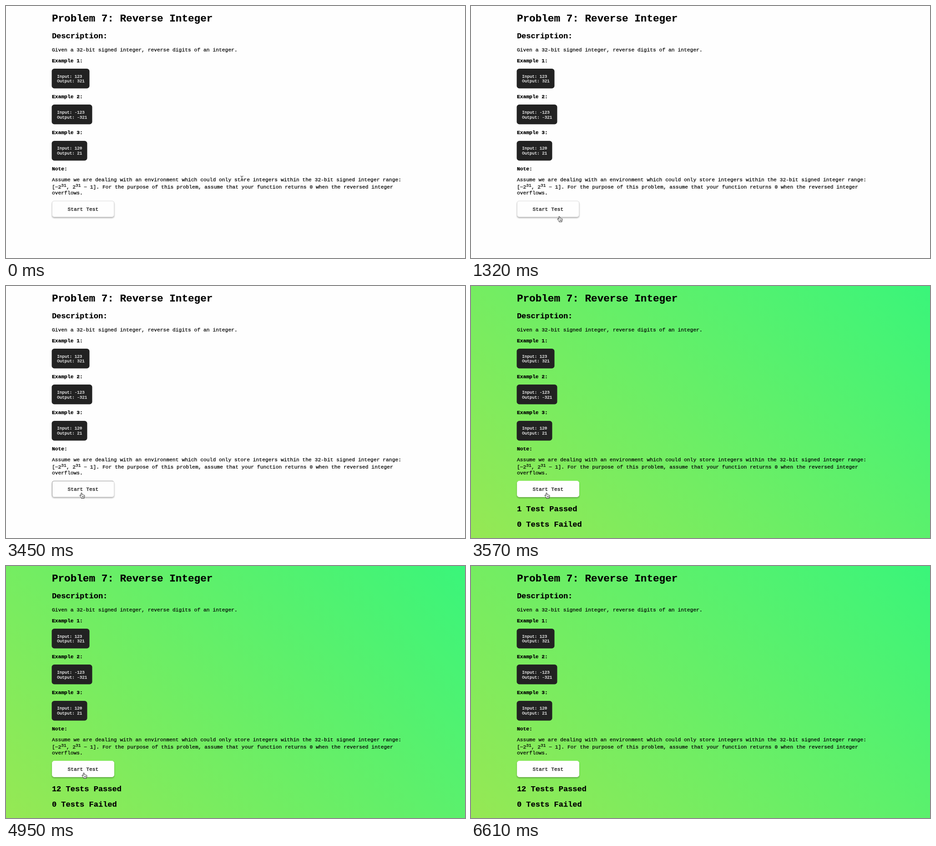
An HTML page that plays this animation: 1009 by 555 pixels, repeating every 7150 ms.

```html
<!DOCTYPE html>
<html lang="en">
<head>
<meta charset="utf-8">
<title>Problem 7: Reverse Integer</title>
<style>
  html, body { margin: 0; width: 100%; height: 100%; overflow: hidden; background: #fefefe; }
  #stage { position: relative; width: 1009px; height: 555px; overflow: hidden; background: #fefefe; }
  #stage.passed { background: linear-gradient(45deg, #96e854, #3af57a); }
  #button {
    position: absolute; left: 101px; top: 429px; width: 137px; height: 36px;
    box-sizing: border-box; border: 1px solid #dedede; border-radius: 5px;
    background: #fefefe; box-shadow: 0 2px 3px rgba(0, 0, 0, .3);
  }
  #button.pressed { border-color: #999 #dedede #dedede #999; }
  .passed #button { border-color: #f4fcf2; }
  svg { position: absolute; left: 0; top: 0; }
  text {
    font-family: "Courier New", "Liberation Mono", monospace; font-size: 11.333px;
    white-space: pre; stroke: #000; stroke-width: .25px;
  }
  .h1 { font-size: 22.667px; }
  .h2 { font-size: 17px; }
  .h1, .h2, .b { font-weight: bold; }
  .code { font-size: 9.208px; fill: #fff; stroke: #fff; }
  .sup { font-size: 9.444px; }
  #results { display: none; }
  .passed #results { display: inline; }
</style>
</head>
<body>
<div id="stage">
  <div id="button"></div>
  <svg width="1009" height="555" viewBox="0 0 1009 555">
    <g id="page"></g>
    <g id="results"></g>
    <g id="cursor">
      <g id="beam" fill="none" stroke-linecap="round">
        <path d="M-2.6-5.5Q0-5.5 0-3.5Q0-5.5 2.6-5.5M0-3.5V3.5M-2.6 5.5Q0 5.5 0 3.5Q0 5.5 2.6 5.5M-1.4 1.8H1.4" stroke="#fff" stroke-width="2"/>
        <path d="M-2.6-5.5Q0-5.5 0-3.5Q0-5.5 2.6-5.5M0-3.5V3.5M-2.6 5.5Q0 5.5 0 3.5Q0 5.5 2.6 5.5M-1.4 1.8H1.4" stroke="#111" stroke-width=".9"/>
      </g>
      <path id="arrow" d="M0 0V10.6L2.4 8.4L4 12.1L5.9 11.3L4.3 7.7H7.6Z" fill="#000" stroke="#fff" stroke-width=".8" stroke-linejoin="round"/>
      <g id="hand" stroke="#111" stroke-width=".9" stroke-linecap="round" stroke-linejoin="round">
        <path d="M-1.1 6V1.1Q-1.1 0 0 0Q1 0 1.1 1.1L1.3 3.9Q2.7 3.1 3.4 4.4Q4.8 3.8 5.3 5Q6.8 4.7 6.8 6.4V8.3Q6.6 9.4 5.9 10.2V12H-.4V10.8Q-1.8 9.4-2.7 7.7L-3.9 5.9Q-3.8 4.4-2.4 4.9Z" fill="#fff"/>
        <path d="M1.4 7.2V9.8M3 7.2V9.8M4.6 7.2V9.8" stroke-width=".7"/>
      </g>
    </g>
  </svg>
</div>
<script>
const LOOP = 7150, LEFT = 100.9, EM = 11.333, CH = 0.6;
const $ = id => document.getElementById(id);
const page = $("page"), results = $("results");

function add(parent, tag, attrs, content = "") {
  const el = document.createElementNS("http://www.w3.org/2000/svg", tag);
  for (const key in attrs) el.setAttribute(key, attrs[key]);
  el.textContent = content;
  parent.append(el);
  return el;
}
const write = (content, y, cls = "", x = LEFT, parent = page) =>
  add(parent, "text", { x, y, class: cls }, content);

write("Problem 7: Reverse Integer", 34.2, "h1");
write("Description:", 71.4, "h2");
write("Given a 32-bit signed integer, reverse digits of an integer.", 99.7);

[["123", "321"], ["-123", "-321"], ["120", "21"]].forEach(([input, output], i) => {
  const y = i * 79.4;
  const out = "Output: " + output;
  write(`Example ${i + 1}:`, y + 123.5, "b");
  add(page, "rect", {
    x: 100.5, y: Math.round(y + 138), width: Math.round(out.length * 5.525 + 22.7), height: 43.5, rx: 5.6, fill: "#222"
  });
  write("Input: " + input, y + 157.6, "code", 112.2);
  write(out, y + 168.2, "code", 112.2);
});

write("Note:", 361.8, "b");
write("Assume we are dealing with an environment which could only store integers within the 32-bit signed integer range:", 386.2);

// Second line mixes normal and raised runs
let x = LEFT;
for (const [run, raised] of [
  ["[\u22122"], ["31", 1], [", 2"], ["31", 1],
  [" \u2212 1]. For the purpose of this problem, assume that your function returns 0 when the reversed integer"]
]) {
  write(run, raised ? 398 : 401.9, raised ? "sup" : "", x);
  x += run.length * CH * (raised ? EM / 1.2 : EM);
}
write("overflows.", 414.6);
write("Start Test", 450.9, "", 135.4);

const passed = write("", 495.8, "h2", LEFT, results);
write("0 Tests Failed", 529.8, "h2", LEFT, results);

// time, cursor shape, hot spot
const moves = [
  [0, "beam", 518.5, 380],
  [960, "beam", 481, 398],
  [1110, "arrow", 327, 438],
  [1210, "arrow", 238, 460],
  [1320, "hand", 194, 463.4],
  [1410, "arrow", 178, 468],
  [1510, "arrow", 168, 472],
  [1610, "arrow", 165, 473],
  [1810, "arrow", 165, 469],
  [1930, "hand", 166, 459],
  [2050, "hand", 166, 455.6],
  [4950, "hand", 171, 455.6],
  [5060, "hand", 190, 452],
  [5170, "arrow", 265, 441],
  [5290, "arrow", 420, 429],
  [5400, "arrow", 575, 427],
  [5520, "arrow", 668, 438],
  [5630, "arrow", 657.8, 446.8],
  [5810, "arrow", 661, 448],
  [5910, "arrow", 676, 453],
  [6010, "arrow", 709, 464],
  [6110, "arrow", 760, 481],
  [6200, "arrow", 820, 501],
  [6300, "arrow", 885, 522],
  [6400, "arrow", 940, 539],
  [6500, "arrow", 975, 549.3],
  [6610, "none", 0, 0]
];
const counts = [[3570, 1], [3690, 3], [3830, 6], [3940, 8], [4050, 10], [4150, 12]];
const stepAt = (steps, t) => steps.findLast(step => step[0] <= t);

function draw(t) {
  const [, shape, cx, cy] = stepAt(moves, t);
  for (const id of ["beam", "arrow", "hand"]) $(id).style.display = id === shape ? "" : "none";
  $("cursor").setAttribute("transform", `translate(${cx} ${cy})`);

  const count = stepAt(counts, t)?.[1] ?? 0;
  $("stage").classList.toggle("passed", count > 0);
  $("button").classList.toggle("pressed", t >= 3450 && t < 3570);
  passed.textContent = `${count} Test${count === 1 ? "" : "s"} Passed`;
}

const start = performance.now();
function tick() {
  draw((performance.now() - start) % LOOP);
  requestAnimationFrame(tick);
}
tick();
</script>
</body>
</html>
```
